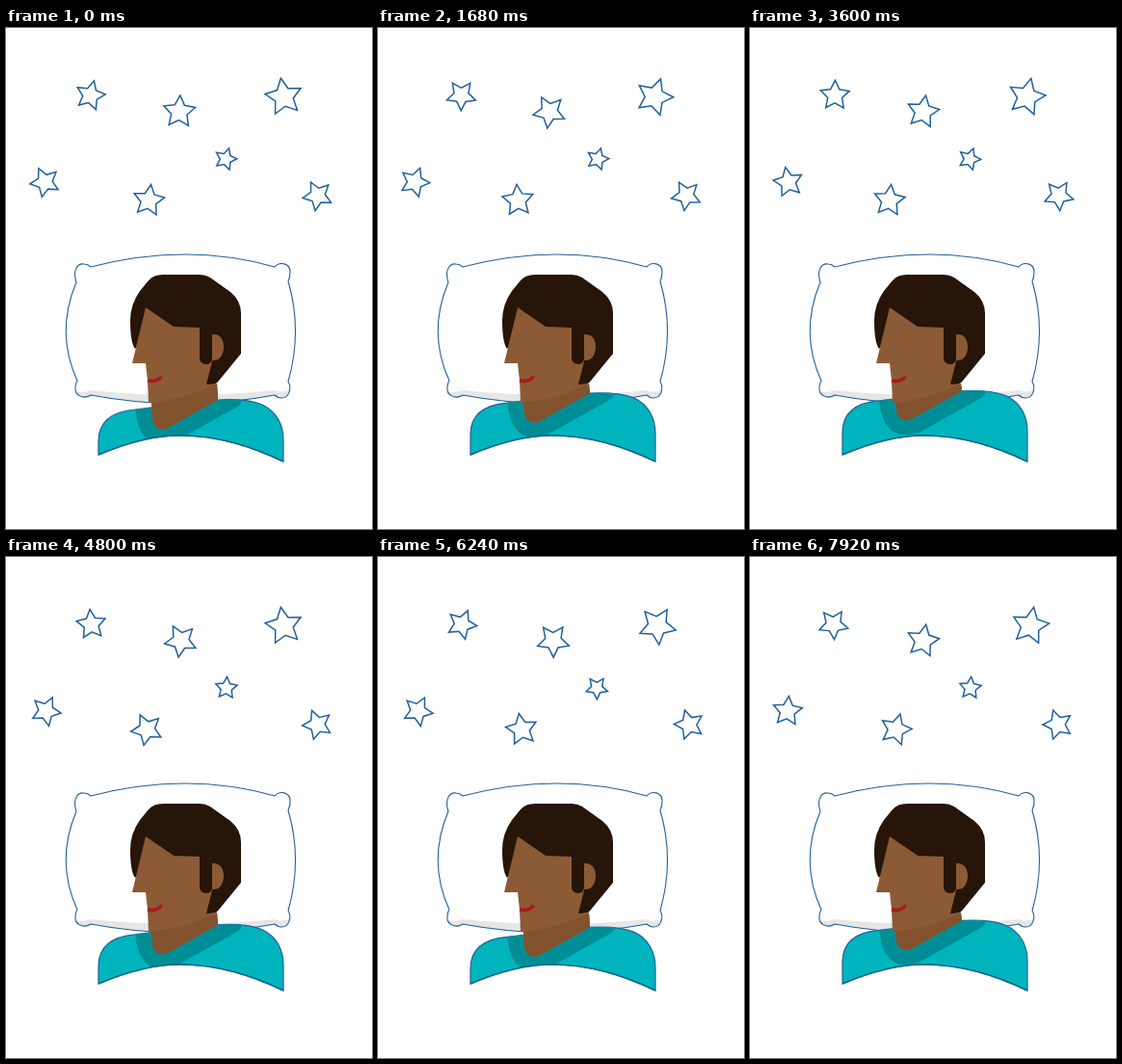
An HTML page with a canvas for the animation above (8 s loop, 380 by 520 pixels).

```html
<!DOCTYPE html>
<html lang="en">
<head>
<meta charset="utf-8">
<title>Sleeper under stars</title>
<style>
html, body { margin: 0; width: 100%; height: 100%; overflow: hidden; background: #fff; }
canvas { display: block; }
</style>
</head>
<body>
<canvas id="stage" width="380" height="520"></canvas>
<script>
const ctx = document.getElementById('stage').getContext('2d');
const LOOP = 8000, STEP = 80, BREATH = 5840, TAU = 2 * Math.PI;
const LINE = '#1f619b', SKIN = '#8c5a35', SHADE = '#83522f', HAIR = '#261508';

// Each star swings like a pendulum: rest angle and swing in degrees, period and peak time in s.
const star = (x, y, r, rest, swing, period, peak) => ({ x, y, r, rest, swing, period, peak });
const stars = [
  star(87.5, 70, 16, 15, 22, 5.84, 1.5),
  star(180, 87, 17.5, 2, 42, 7.7, 1.9),
  star(289, 71.5, 20, -20, 42, 11.5, 2.4),
  star(40, 160, 16, 56, 38, 7, 2),
  star(148, 179, 17, 12, 72, 11.2, 2.9),
  star(228, 136, 12, 19, 17, 3.7, 2.7),
  star(321.5, 174, 16, 14, 46, 5.9, 2.5)
];

function paint(shape, fill, stroke, width = 1) {
  const path = typeof shape === 'string' ? new Path2D(shape) : shape;
  if (fill) { ctx.fillStyle = fill; ctx.fill(path); }
  if (stroke) { ctx.strokeStyle = stroke; ctx.lineWidth = width; ctx.stroke(path); }
}

function starPath(r) {
  const p = new Path2D();
  for (let i = 0; i < 10; i++) {
    const a = (i / 10 - 0.25) * TAU, d = i % 2 ? r * 0.5 : r;
    p.lineTo(d * Math.cos(a), d * Math.sin(a));
  }
  p.closePath();
  return p;
}

function drawStar(s, t) {
  const swing = s.swing * Math.cos(TAU * (t - s.peak) / s.period);
  ctx.save();
  ctx.translate(s.x - swing * 0.05, s.y);
  ctx.rotate((s.rest + swing) * TAU / 360);
  paint(starPath(s.r - 0.3), '#fff', LINE, 1.5);
  ctx.restore();
}

const pillow = new Path2D('M88 248 Q188 222 279 248 C284 242 295 244 295 253 ' +
  'Q295 259 293 263 Q308 314 293 367 C297 374 294 384 286 384 Q282 384 279 381 ' +
  'Q184 399 88 381 C80 386 71 381 72 373 Q72 369 74 366 Q51 316 73 264 ' +
  'C69 252 74 244 81 245 Q85 245 88 248 Z');

function drawPillow() {
  paint(pillow, '#fff');
  ctx.save();
  ctx.clip(pillow);
  paint('M70 376 Q78 380 88 376 Q184 386 279 376 Q288 380 297 374 V400 H70 Z', '#e6e6e6');
  ctx.restore();
  paint(pillow, null, LINE, 1.1);
}

function drawHead() {
  paint('M129 304 Q129 287 139 273 L148 262 Q153 256 163 256 H201 Q207 256 212 259 ' +
    'L233 274 Q244 283 244 296 V338 L221 366 Q218 370 214 370 H208 L150 310 L134 333 ' +
    'Q129 326 129 304 Z', HAIR);
  paint('M145 290 L174 310 L201 311 V325 H214 V346 L208 370 H219 L220 387 L180 388 L148 389 ' +
    'L147 366 L145 348 H131 Z', SKIN);
  paint('M214 318 C222 317 226 323 226 331 C226 339 222 346 214 345 Z', SKIN);
  paint('M201 309 H214 V342 Q214 349 208 349 Q201 349 201 342 Z', HAIR);
  paint('M147 366 Q157 368 161.5 361.5', null, '#a51c20', 3.8);
}

function drawShirt(dy) {
  const y = v => v + dy;
  const hem = 'C254 434 220 423 180 423 C150 423 122 432 96 443';
  const shirt = new Path2D(`M96 443 V${y(429)} C96 ${y(408)} 111 ${y(398)} 134 ${y(396)} ` +
    `L151 ${y(394)} L167 ${y(412)} L220 ${y(386)} C240 ${y(385)} 254 ${y(386)} 266 ${y(391)} ` +
    `C281 ${y(398)} 288 ${y(412)} 288 ${y(428)} V450 ${hem} Z`);
  paint(shirt, '#00b4bd', LINE, 1.2);
  ctx.save();
  ctx.clip(shirt);
  paint(`M134 ${y(393)} Q136 ${y(426)} 155 ${y(431)} Q165 ${y(433)} 176 ${y(429)} ` +
    `L242 ${y(392)} Q246 ${y(389)} 244 ${y(383)} L220 ${y(384)} L167 ${y(413)} ` +
    `L151 ${y(392)} Z`, '#008e96');
  ctx.restore();
  const neck = new Path2D(`M148 376 L219 369 L220 ${y(386)} L168 ${y(415)} ` +
    `Q163 ${y(418)} 157 ${y(415)} Q152 ${y(412)} 152 ${y(405)} L151 389 H148 Z`);
  paint(neck, SKIN);
  ctx.save();
  ctx.clip(neck);
  paint('M148 389 Q185 386 220 369 V420 H148 Z', SHADE);
  ctx.restore();
  paint(`M288 450 ${hem}`, null, '#17658f', 1.6);
}

function render(ms) {
  const t = Math.floor(ms % LOOP / STEP) * STEP;
  const phase = t % BREATH / BREATH;
  const lift = 12 * (1 - Math.abs(1 - 2 * phase));
  ctx.fillStyle = '#fff';
  ctx.fillRect(0, 0, 380, 520);
  for (const s of stars) drawStar(s, t / 1000);
  drawPillow();
  drawHead();
  drawShirt(-lift);
}

let start;
function tick(now) {
  start ??= now;
  render(now - start);
  requestAnimationFrame(tick);
}
render(0);
requestAnimationFrame(tick);
</script>
</body>
</html>
```
